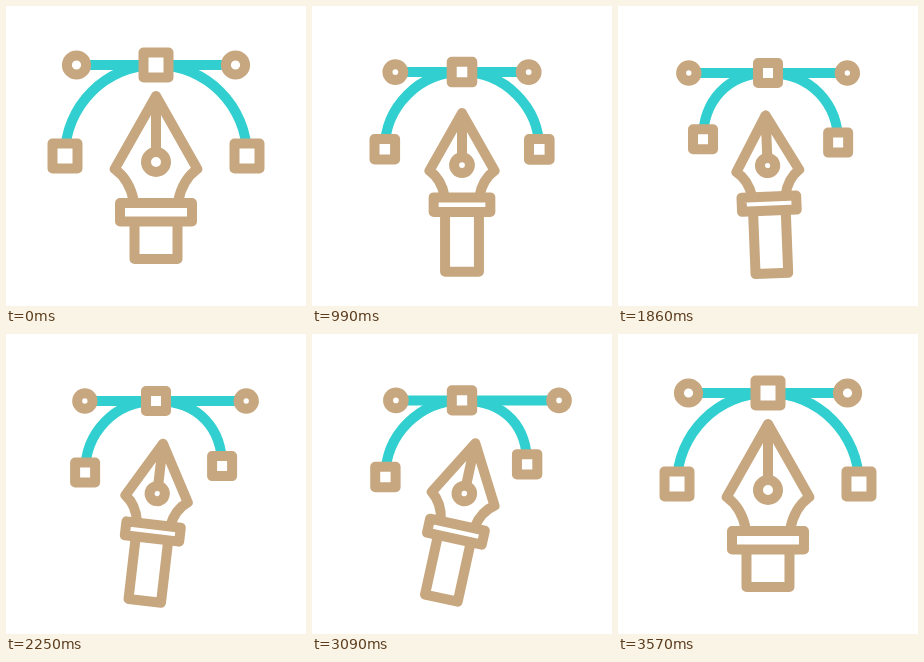
Animation of 300x300 px, one loop 3.6 s. Source, as an HTML page without scripts:

```html
<!DOCTYPE html>
<html lang="en">
<head>
<meta charset="utf-8">
<title>Pen tool</title>
<style>
  /* shrink amount, and how far the left and right handles are pulled */
  @property --p { syntax: "<number>"; inherits: true; initial-value: 0; }
  @property --l { syntax: "<number>"; inherits: true; initial-value: 0; }
  @property --r { syntax: "<number>"; inherits: true; initial-value: 0; }

  html, body { margin: 0; width: 100%; height: 100%; overflow: hidden; background: #fff; }
  svg {
    display: block; width: 100%; height: 100%;
    fill: none; stroke: #c7a77f; stroke-width: 10; stroke-linejoin: round;
  }
  svg * { vector-effect: non-scaling-stroke; }
  svg, .arc { animation: swing 3.6s cubic-bezier(.37, 0, .63, 1) infinite; }

  @keyframes swing {
    0%, 9.17% { --p: 0; --l: 0; --r: 0; }
    32.78%    { --p: 1; --l: 0; --r: 0; }
    46.11%    { --p: 1; --l: 1; --r: 0; }
    58.4%     { --p: 1; --l: 0; --r: 1; }
    70.8%     { --p: 1; --l: 1; --r: 0; }
    82.85%    { --p: 1; --l: 0; --r: 1; }
    99.58%, 100% { --p: 0; --l: 0; --r: 0; }
  }
  /* a pulled handle makes its curve bulge */
  @keyframes bulge-left {
    0%, 32.78%, 58.4%, 82.85%, 100% { d: path("M0 0C-.552 0 -1 .448 -1 1"); }
    46.11%, 70.8% { d: path("M0 0C-.71 0 -1 .448 -1 1"); }
  }
  @keyframes bulge-right {
    0%, 46.11%, 70.8%, 99.58%, 100% { d: path("M0 0C-.552 0 -1 .448 -1 1"); }
    58.4%, 82.85% { d: path("M0 0C-.71 0 -1 .448 -1 1"); }
  }
  .left .arc { animation-name: bulge-left; }
  .right .arc { animation-name: bulge-right; }

  .curve { transform: translate(150px, calc(59px + 8px * var(--p))); }
  .left {
    --x: calc(91 - 15.6 * var(--p) - 18.2 * var(--l));
    --y: calc(91 - 15.6 * var(--p) - 16 * var(--l));
    --arm: calc(79.5 - 14.5 * var(--p) + 24.8 * var(--l));
  }
  .right {
    --x: calc(91 - 15.5 * var(--p) - 12.5 * var(--r));
    --y: calc(91 - 15.5 * var(--p) - 13.8 * var(--r));
    --arm: calc(79.5 - 14.5 * var(--p) + 33.5 * var(--r));
    transform: scaleX(-1);
  }
  .line { stroke: #32cfd0; }
  .arm { transform: scaleX(var(--arm)); }
  .arc { transform: scale(var(--x), var(--y)); }
  .knob, .box { fill: #fff; }
  .knob { transform: translateX(calc(-1px * var(--arm))) scale(calc(1 - .2 * var(--p))); }
  .box { transform: scale(calc(1 - .2 * var(--p))); }
  .end { transform: translate(calc(-1px * var(--x)), calc(1px * var(--y))); }

  .pen { transform: translate(150px, 170px) rotate(calc(13.4deg * var(--r) - 14deg * var(--l))); }
  .nib { transform: translateY(calc(-14px + 3.5px * var(--p))) scale(calc(1 - .24 * var(--p))); }
  .barrel {
    transform: translateY(calc(45.5px - 10.8px * var(--p)))
      scale(calc(1 - .24 * var(--p)), calc(37.5 + 25.3 * var(--p)));
  }
</style>
</head>
<body>
<svg viewBox="0 0 300 300">
  <defs>
    <rect id="box" class="box" x="-12.5" y="-12.5" width="25" height="25"/>
    <g id="handles">
      <path class="line arm" d="M0 0H-1"/>
      <circle class="knob" r="9.6"/>
      <g class="end"><use href="#box"/></g>
    </g>
  </defs>
  <g class="curve">
    <g class="left">
      <path class="line arc" d="M0 0C-.552 0 -1 .448 -1 1"/>
      <use href="#handles"/>
    </g>
    <g class="right">
      <path class="line arc" d="M0 0C-.552 0 -1 .448 -1 1"/>
      <use href="#handles"/>
    </g>
    <use href="#box"/>
  </g>
  <g class="pen">
    <path class="barrel" d="M-21.5 0V1H21.5V0"/>
    <g class="nib">
      <path d="M-22 40Q-26 18 -41.3 7L0 -66L41.3 7Q26 18 22 40M0 -66V-10"/>
      <circle r="10"/>
      <rect x="-36" y="41" width="72" height="18.5"/>
    </g>
  </g>
</svg>
</body>
</html>
```
